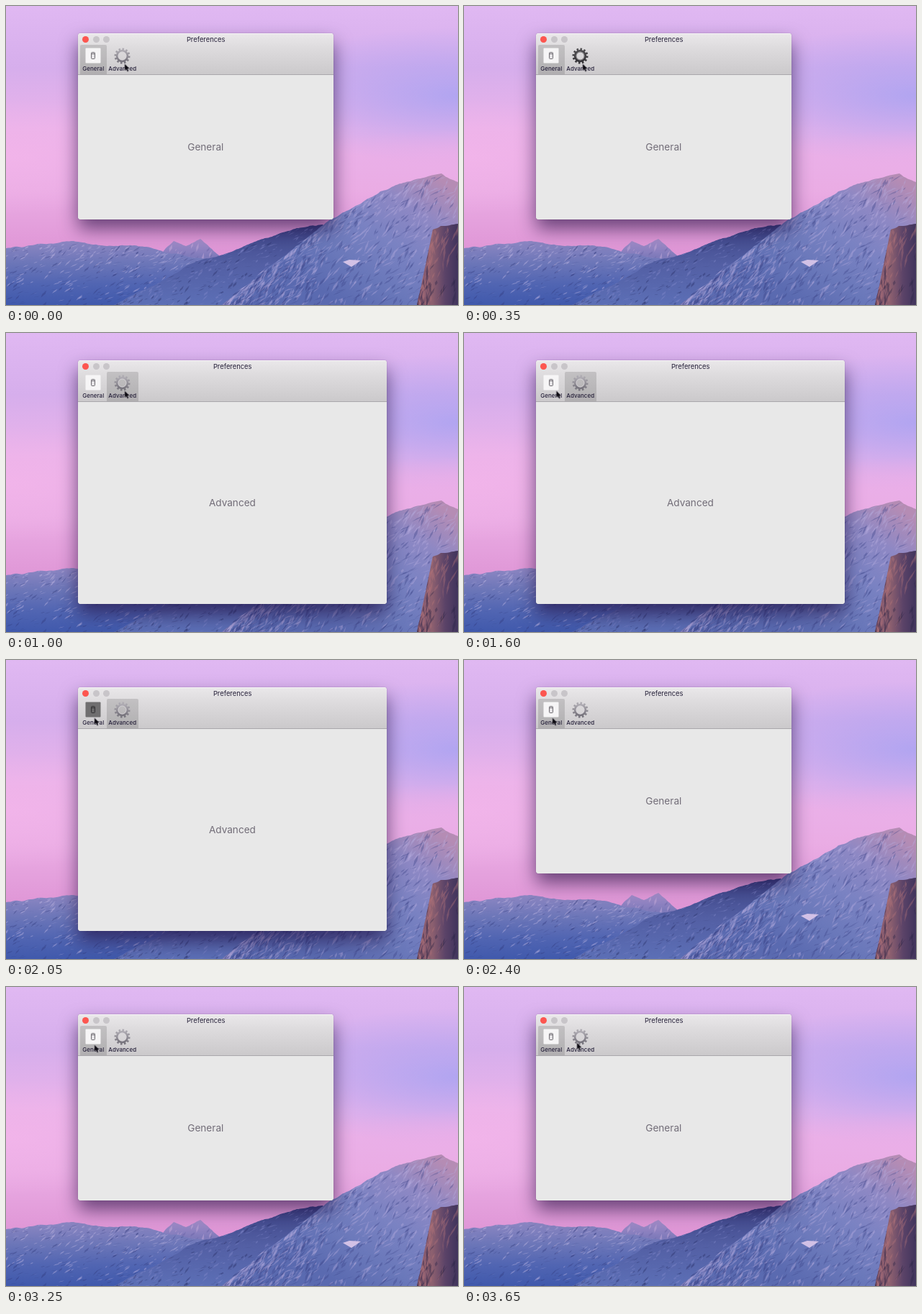
Write an HTML page with a canvas that moves like this. It is 628x416 px and loops after 3.7 s.

```html
<!DOCTYPE html>
<html lang="en">
<head>
<meta charset="utf-8">
<title>Preferences</title>
<style>
  html, body { margin: 0; width: 100%; height: 100%; overflow: hidden; }
  body { position: relative; font-family: Inter, "Open Sans", sans-serif; color: #26213a; background: #dfb4ee; }
  canvas, .abs, .window, .light, .item, .item * { position: absolute; }
  canvas { left: 0; top: 0; }
  .window { left: 100px; top: 38px; border-radius: 4px; background: #e8e8e8; overflow: hidden; }
  #shadow { overflow: visible; box-shadow: 0 0 1px rgba(40, 20, 60, .6), 0 13px 26px rgba(22, 2, 52, .6); }
  .bar {
    left: 0; right: 0; top: 0; height: 57px;
    background: linear-gradient(#eae8ea, #dcdadc 40%, #cbc9cb);
    border-bottom: 1px solid #aaa8ac; box-shadow: inset 0 1px #f6f4f6;
  }
  .title { left: 0; right: 0; top: 0; font-size: 9.4px; line-height: 17px; text-align: center; }
  .light { top: 3.5px; width: 9px; height: 9px; border-radius: 50%; background: #c8c5c9; }
  .red { background: #fc5650; }
  .item { top: 16px; height: 41px; }
  .sel { inset: 0; background: rgba(0, 0, 0, .13); border-radius: 2px 2px 0 0; }
  .item svg { left: 50%; top: 2.5px; margin-left: -12px; }
  .item span { left: 0; right: 0; top: 28px; font-size: 8px; font-weight: 500; line-height: 10px; text-align: center; }
  .page { font-size: 13.6px; line-height: 20px; color: #726d78; transform: translate(-50%, -50%); white-space: nowrap; }
</style>
</head>
<body>
<canvas id="scene" width="628" height="416"></canvas>
<div class="window" id="shadow"></div>
<div class="window" id="panel">
  <div class="abs bar"></div>
  <div class="abs title">Preferences</div>
  <i class="light red" style="left:5.7px"></i>
  <i class="light" style="left:20.6px"></i>
  <i class="light" style="left:35.4px"></i>
  <div class="item" style="left:3px;width:36.5px">
    <div class="sel" id="selGeneral"></div>
    <svg id="iconGeneral" width="24" height="24">
      <rect x="1.5" y="1.5" width="21" height="21" rx="1" fill="#f6f5f6"/>
      <rect x="9.5" y="7.5" width="5" height="9" rx="1" fill="#e4e2e5" stroke="#6d6a70"/>
      <path d="M10 9.500h4" stroke="#6d6a70"/>
    </svg>
    <span>General</span>
  </div>
  <div class="item" style="left:39.5px;width:44.5px">
    <div class="sel" id="selAdvanced"></div>
    <svg id="iconAdvanced" width="24" height="24" fill="none">
      <defs><linearGradient id="steel" x2="0" y2="1"><stop stop-color="#aeabb2"/><stop offset="1" stop-color="#77747d"/></linearGradient></defs>
      <g stroke="url(#steel)">
        <circle cx="11.5" cy="12.5" r="9.5" stroke-width="3" pathLength="24" stroke-dasharray="1 1"/>
        <circle cx="11.5" cy="12.5" r="7.3" stroke-width="2.8"/>
      </g>
      <circle cx="11.5" cy="12.5" r="5.500" stroke="#d8d5da" stroke-width=".8"/>
    </svg>
    <span>Advanced</span>
  </div>
  <div class="abs page" id="pageGeneral" style="left:177.3px;top:158.3px">General</div>
  <div class="abs page" id="pageAdvanced" style="left:214.4px;top:198.3px">Advanced</div>
</div>
<svg class="abs" id="cursor" style="left:0;top:0" width="10" height="14" viewBox="0 0 11 15">
  <path d="M.7.8v10.400l2.400-2.200 1.700 3.800 1.600-.7L4.800 8.300H8z" fill="#0b0910" stroke="#e6e2ea" stroke-width=".6" paint-order="stroke"/>
</svg>

<script>
const $ = id => document.getElementById(id);

// ---------- scenery ----------
const c = $('scene').getContext('2d'), W = 628, H = 416;
let seed = 11;
const rnd = () => (seed = seed * 16807 % 2147483647) / 2147483647;
const spread = n => (rnd() * 2 - 1) * n;

function fade(colors, x0, y0, x1, y1) {
  const g = c.createLinearGradient(x0, y0, x1, y1);
  colors.forEach((color, i) => g.addColorStop(i / (colors.length - 1), color));
  return g;
}

function glow(x, y, rx, ry, rgb) {
  c.save();
  c.translate(x, y);
  c.scale(rx, ry);
  const g = c.createRadialGradient(0, 0, 0, 0, 0, 1);
  [.8, .4, 0].forEach((alpha, i) => g.addColorStop(i / 2, `rgba(${rgb},${alpha})`));
  c.fillStyle = g;
  c.fillRect(-1, -1, 2, 2);
  c.restore();
}

// Midpoint displacement between key points gives a rough skyline.
function roughen(a, b) {
  const len = Math.hypot(b[0] - a[0], b[1] - a[1]);
  if (len < 4) return [a];
  const mid = [(a[0] + b[0]) / 2, (a[1] + b[1]) / 2 + spread(Math.min(len * .06, 2))];
  return [...roughen(a, mid), ...roughen(mid, b)];
}

// A mountain: a skyline, a gradient, and thin slivers that get darker downhill.
function mountain(keys, paint, { angle, light, dark, size = 10, count = 0 }) {
  const line = keys.slice(1).flatMap((p, i) => roughen(keys[i], p)).concat([keys[keys.length - 1]]);
  c.save();
  c.beginPath();
  line.forEach(p => c.lineTo(...p));
  c.lineTo(line[line.length - 1][0], H);
  c.lineTo(line[0][0], H);
  c.clip();
  c.fillStyle = paint;
  c.fillRect(0, 0, W, H);
  for (let i = 0; i < count; i++) {
    const [x, top] = line[Math.floor(rnd() * line.length)], depth = rnd() ** 1.4;
    const y = top + depth * (H - top), a = angle + spread(.5), len = size * (.3 + rnd());
    const dx = Math.cos(a) * len, dy = Math.sin(a) * len, wide = .6 + rnd() * 1.6;
    c.fillStyle = `rgba(${rnd() > .3 + depth * .4 ? light : dark},.38)`;
    c.beginPath();
    c.moveTo(x, y);
    c.lineTo(x + dx / 2 - wide, y + dy / 2);
    c.lineTo(x + dx, y + dy);
    c.lineTo(x + dx / 2 + wide, y + dy / 2);
    c.fill();
  }
  c.restore();
}

function drawScene() {
  c.fillStyle = fade(['#e0b8f2', '#d6aeec', '#eab3ea', '#eaace4', '#df96d6'], 0, 0, 0, H * .82);
  c.fillRect(0, 0, W, H);
  glow(0, 210, 230, 80, '243,181,234');
  glow(W, 125, 300, 95, '166,162,242');
  glow(W, 212, 230, 40, '234,174,232');

  mountain([[215, 346], [233, 327], [250, 334], [270, 324], [296, 347]],
    fade(['#a890cc', '#7f7aba'], 0, 324, 0, 348),
    { angle: 1.9, light: '212,182,224', dark: '98,94,160', count: 50 });
  mountain([[0, 337], [100, 328], [150, 334], [195, 335], [250, 348], [460, 380]],
    fade(['#8c86c2', '#6c76b8', '#5165b2', '#4059ac'], 0, 328, 0, H),
    { angle: 2.7, light: '206,192,232', dark: '48,56,122', count: 900 });
  mountain([[150, H], [250, 362], [325, 337], [404, 309], [440, 304], [540, H]],
    fade(['#3d4385', '#535fa4', '#5c6fb6'], 0, 304, 0, H),
    { angle: 2.6, light: '134,140,204', dark: '38,44,98', count: 600 });
  mountain([[300, H], [436, 308], [520, 258], [605, 233], [W, 245]],
    fade(['#b58cb4', '#8e88c4', '#7a82c2', '#6a78ba', '#5a6ab0'], 590, 233, 470, H),
    { angle: 2.35, light: '182,172,222', dark: '62,68,136', size: 16, count: 1100 });
  c.fillStyle = '#d2c1e6';
  c.fill(new Path2D('M468 356l9-3 16 1-13 9z'));
  mountain([[571, H], [593, 311], [604, 306], [W, 303]],
    fade(['#80566f', '#8d606f', '#5b4368', '#40345c'], 574, 0, W, 0),
    { angle: 1.8, light: '180,116,122', dark: '40,34,70', size: 20, count: 130 });
}
drawScene();

// ---------- motion ----------
const LOOP = 3700, STEP = 50;
const OPEN = 440, CLOSE = 2110, SPAN = 250, PRESS = 110;

function play(id, rows) {
  const frames = rows.map(([t, style, easing = 'linear']) => ({ ...style, offset: t / LOOP, easing }));
  $(id).animate(frames, { duration: LOOP, iterations: Infinity, delay: -2, easing: `steps(${LOOP / STEP})` });
}

// Eases from a to b when the window grows, and back when it shrinks.
const swap = (id, a, b) => play(id, [
  [0, a], [OPEN, a, 'ease-in-out'], [OPEN + SPAN, b],
  [CLOSE, b, 'ease-in-out'], [CLOSE + SPAN, a], [LOOP, a]
]);

// Shows b between two times and a otherwise, without easing.
const hold = (id, a, b, from, to) => play(id,
  [[0, a], [from, b], [to, a], [LOOP, a]].map(row => [...row, 'steps(1)']));

const size = (width, height) => ({ width: width + 'px', height: height + 'px' });
const at = (x, y) => ({ transform: `translate(${x - .7}px, ${y - .5}px)` });
const on = { opacity: 1 }, off = { opacity: 0 };
const idle = { filter: 'brightness(1)' }, pressed = { filter: 'brightness(.45)' };

for (const id of ['shadow', 'panel']) swap(id, size(355.4, 258.800), size(429.4, 338.800));
swap('pageGeneral', on, off);
swap('pageAdvanced', off, on);
hold('selGeneral', on, off, OPEN, CLOSE);
hold('selAdvanced', off, on, OPEN, CLOSE);
hold('iconAdvanced', idle, pressed, OPEN - PRESS, OPEN);
hold('iconGeneral', idle, pressed, CLOSE - PRESS, CLOSE);

const overAdvanced = at(165, 80), overGeneral = at(123, 80);
play('cursor', [
  [0, overAdvanced], [1300, overAdvanced, 'ease-in-out'], [1700, overGeneral],
  [3350, overGeneral, 'ease-in'], [3650, at(157, 77)], [LOOP, overAdvanced]
]);
</script>
</body>
</html>
```
